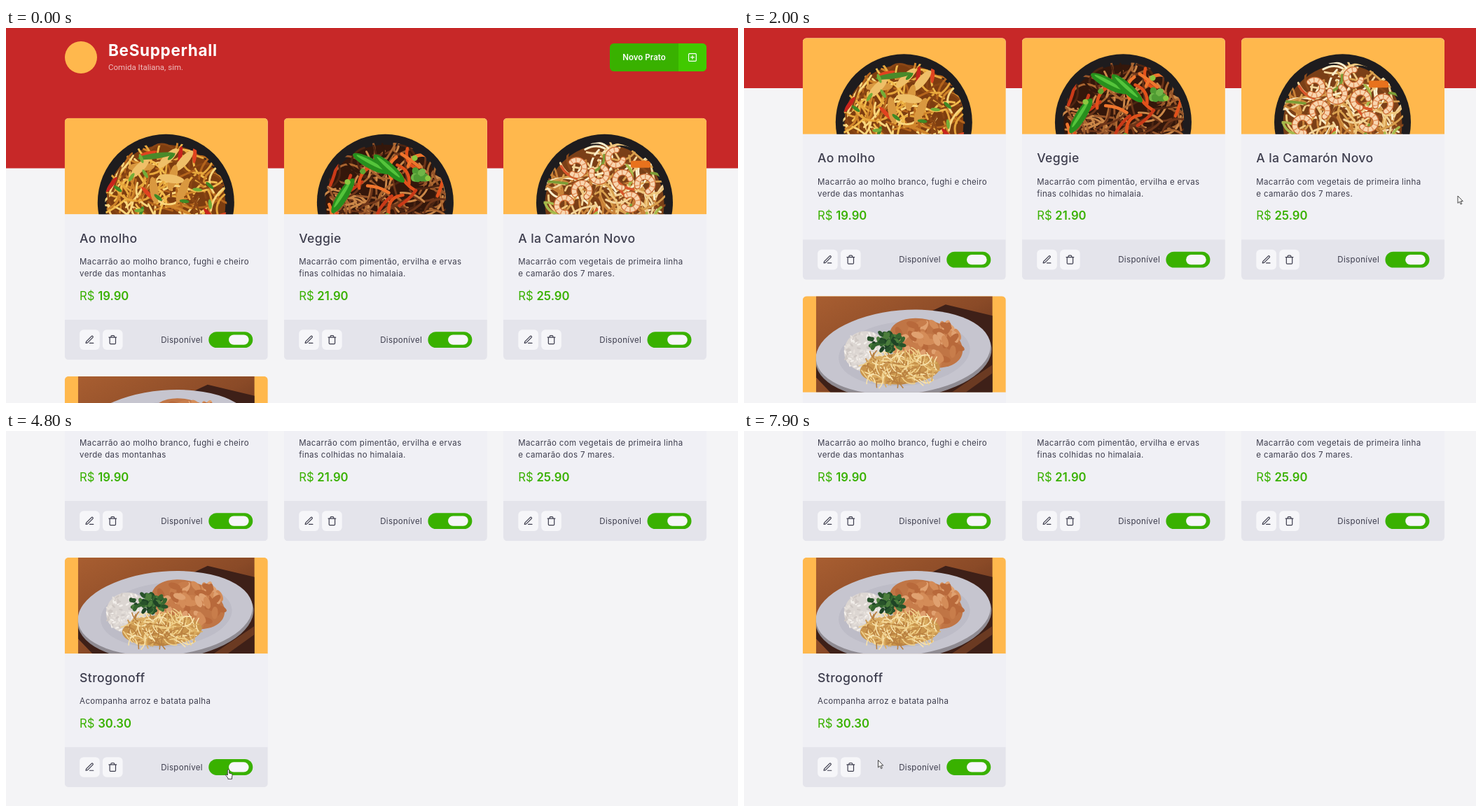
Write an HTML page that moves like this. It is 1045 px wide and 536 px high and loops after 8000 ms.

```html
<!DOCTYPE html>
<html lang="pt-BR">
<head>
<meta charset="utf-8">
<title>Cardápio</title>
<style>
  html, body { margin: 0; width: 100%; height: 100%; overflow: hidden; background: #f4f4f6; }
  svg { display: block; }
  text { font-family: Inter, sans-serif; fill: #3d3d4d; font-size: 11.5px; letter-spacing: .03em; }
  .brand { font-size: 22.5px; font-weight: 700; fill: #fff; }
  .tag { font-family: Roboto, sans-serif; fill: #eebebe; letter-spacing: 0; }
  .new { font-weight: 600; fill: #fff; letter-spacing: 0; text-anchor: middle; }
  .name { font-size: 17.6px; font-weight: 500; letter-spacing: .02em; }
  .price { font-size: 16.7px; fill: #39b100; letter-spacing: 0; }
  .price tspan { font-weight: 600; }
  .state { text-anchor: end; }
  .icon { fill: none; stroke: #3d3d4d; stroke-width: 2; stroke-linecap: round; stroke-linejoin: round; }
  .line { fill: none; stroke-linecap: round; }
  .cursor { fill: #fff; stroke: #333; stroke-width: .9; stroke-linejoin: round; }
</style>
</head>
<body>
<svg id="stage" width="1045" height="536" viewBox="0 0 1045 536"></svg>
<script>
const LOOP = 8000, STEP = 100;
const ORANGE = '#ffb84d', ON = [57, 177, 0], OFF = [199, 40, 40];
const PIC_H = 137.5, FOOT_H = 57.3, LINE_H = 17.2;

const ICONS = {
  edit: 'M12 20h9M16.5 3.5a2.12 2.12 0 0 1 3 3L7 19l-4 1 1-4z',
  trash: 'M3 6h18M19 6v14a2 2 0 0 1-2 2H7a2 2 0 0 1-2-2V6m3 0V4a2 2 0 0 1 2-2h4a2 2 0 0 1 2 2v2',
  plus: 'M5 3h14a2 2 0 0 1 2 2v14a2 2 0 0 1-2 2H5a2 2 0 0 1-2-2V5a2 2 0 0 1 2-2zM12 8v8M8 12h8'
};

let seed = 7919;
const random = () => (seed = (seed * 16807) % 2147483647) / 2147483647;

const rect = (x, y, w, h, fill, r = 0, extra = '') =>
  `<rect x="${x}" y="${y}" width="${w}" height="${h}" rx="${r}" fill="${fill}" ${extra}/>`;
const text = (x, y, cls, str) => `<text x="${x}" y="${y}" class="${cls}">${str}</text>`;
const icon = (name, x, y, style = '') =>
  `<path class="icon" d="${ICONS[name]}" transform="translate(${x} ${y}) scale(.597)" style="${style}"/>`;
const blob = (fill, x, y, rx, ry, turn = 0) =>
  `<ellipse rx="${rx}" ry="${ry}" fill="${fill}" transform="translate(${x} ${y}) rotate(${turn})"/>`;

// Shapes to scatter: each takes a place, a tone and a turn in degrees.
const strand = (len, width) => (x, y, tone, turn) =>
  `<path class="line" stroke="${tone}" stroke-width="${width}" d="M${-len / 2} 0q${len / 2} ${len * (random() - .5)} ${len} 0"
    transform="translate(${x} ${y}) rotate(${turn})"/>`;
const chunk = (rx, ry) => (x, y, tone, turn) => blob(tone, x, y, rx, ry, turn);
const pepper = (x, y, tone, turn) =>
  blob(tone, x, y, 29, 7.5, turn) + blob('#54c43b', x - 1, y - 2, 22, 2.5, turn);
const shrimp = (x, y, tone, turn) =>
  `<g class="line" transform="translate(${x} ${y}) rotate(${turn})">
    <path d="M-8 8A11 11 0 1 1 9 7" stroke="#c9652f" stroke-width="9"/>
    <path d="M-8 8A11 11 0 1 1 9 7" stroke="${tone}" stroke-width="6.5"/>
    <path d="M-8 8A11 11 0 1 1 9 7" stroke="#e79a66" stroke-width="6.5" stroke-dasharray="1.5 5" stroke-linecap="butt"/></g>`;

// Spreads n shapes at random over an ellipse, cycling through the tones.
function scatter(n, tones, [cx, cy, rx, ry], shape) {
  return Array.from({ length: n }, (_, i) => {
    const a = random() * 2 * Math.PI, d = Math.sqrt(random());
    const x = cx + Math.cos(a) * d * rx, y = cy + Math.sin(a) * d * ry;
    return shape(x.toFixed(1), y.toFixed(1), tones[i % tones.length], Math.round(random() * 360));
  }).join('');
}

const FOOD = [144.5, 116, 84, 76];

function bowl(id, base, tones, topping) {
  return rect(0, 0, 290, PIC_H, ORANGE) +
    `<circle cx="144.5" cy="120.5" r="97.5" fill="#1e1c1e"/>
    <clipPath id="${id}"><circle cx="144.5" cy="121" r="87"/></clipPath>
    <g clip-path="url(#${id})"><circle cx="144.5" cy="123" r="85" fill="${base}"/>` +
    scatter(190, tones, FOOD, strand(36, 2.9)) + topping + '</g>';
}

const sauced = () => bowl('sauced', '#7d3d10',
  ['#f2bb4c', '#cf842a', '#f9d67d', '#8a4614', '#e7a73c', '#b5651c'],
  scatter(9, ['#c8241c', '#e0431f'], FOOD, chunk(13, 3)) +
  scatter(8, ['#d9983f', '#efbf68'], [148, 90, 50, 36], chunk(19, 6)) +
  blob('#4a8a2a', 130, 54, 26, 4, -8) +
  scatter(14, ['#3f8a26', '#74ad38'], FOOD, chunk(7, 2.5)));

const veggie = () => bowl('veggie', '#34170b',
  ['#ab6630', '#6d3519', '#cb8748', '#32170b', '#96552a', '#4d2512'],
  scatter(22, ['#e2511b', '#f0752c', '#c93a18'], FOOD, strand(32, 4.5)) +
  pepper(124, 65, '#278f1d', 28) + pepper(150, 72, '#278f1d', 42) + pepper(84, 111, '#278f1d', -58) +
  scatter(7, ['#4f9b33', '#6fb547'], [196, 81, 11, 9], chunk(6, 5)) +
  scatter(12, ['#8cc63f', '#5fa52f'], FOOD, chunk(4, 4)));

const seafood = () => bowl('seafood', '#7a3f17',
  ['#f3d59b', '#d9a04e', '#fbeecb', '#8c4a1c', '#c98238', '#f0c880'],
  scatter(18, ['#7c9c35', '#d9562a', '#a6b94a'], FOOD, strand(28, 3.6)) +
  rect(182, 61, 28, 10, '#e8721d', 2) +
  Array.from({ length: 8 }, (_, i) => {
    const a = Math.PI * (.95 + i / 6.4), r = i % 2 ? 36 : 60;
    return shrimp(146 + Math.cos(a) * r, 115 + Math.sin(a) * r, '#f8d6b0', i * 75 - 60);
  }).join(''));

const stroganoff = () => rect(0, 0, 290, PIC_H, ORANGE) +
  `<linearGradient id="wood" x2="1" y2="1"><stop stop-color="#a85e31"/><stop offset=".5" stop-color="#8a4a27"/>
    <stop offset="1" stop-color="#4a2415"/></linearGradient>
  <clipPath id="photo"><rect x="19" width="252" height="${PIC_H}"/></clipPath>
  <g clip-path="url(#photo)">` + rect(19, 0, 252, PIC_H, 'url(#wood)') +
  `<path d="M204 12L271 28V138H40L19 116V98Z" fill="#3e2018"/>
  <path d="M212 138L271 98V110L232 138Z" fill="#6b3a22"/>` +
  blob('#8f8b92', 144, 84, 126, 62, -5) + blob('#c6c5cf', 143.5, 80, 125, 60, -5) +
  blob('#bdbcc7', 145, 82, 94, 46, -5) +
  blob('#dcd6d2', 90, 79, 31, 29) +
  scatter(110, ['#f3efeb', '#cfc8c4', '#e6e0db'], [90, 79, 31, 28], chunk(3, 1.3)) +
  blob('#c07545', 176, 67, 54, 33, 18) +
  scatter(75, ['#d48c58', '#b8693b', '#e0a170', '#c87d4b'], [176, 66, 50, 29], chunk(9, 4.5)) +
  blob('#c9944c', 139, 104, 57, 22, -3) +
  scatter(130, ['#f0d08a', '#dcae62', '#f8e2ab', '#b98040'], [139, 103, 56, 22], strand(20, 1.6)) +
  scatter(65, ['#1f4426', '#34652f', '#28532a', '#4b7d3c'], [119, 66, 25, 13], chunk(5, 2.8)) + '</g>';

const DISHES = [
  { name: 'Ao molho', lines: ['Macarrão ao molho branco, fughi e cheiro', 'verde das montanhas'], price: '19.90', pic: sauced },
  { name: 'Veggie', lines: ['Macarrão com pimentão, ervilha e ervas', 'finas colhidas no himalaia.'], price: '21.90', pic: veggie },
  { name: 'A la Camarón Novo', lines: ['Macarrão com vegetais de primeira linha', 'e camarão dos 7 mares.'], price: '25.90', pic: seafood },
  { name: 'Strogonoff', lines: ['Acompanha arroz e batata palha'], price: '30.30', pic: stroganoff }
];

function card(dish, i) {
  const x = 83.8 + (i % 3) * 313.1, y = i < 3 ? 128.8 : 497.8;
  const drop = (dish.lines.length - 1) * LINE_H, foot = 271 + drop, mid = foot + FOOT_H / 2;
  const button = (name, bx) =>
    rect(bx, mid - 14.3, 28.6, 28.6, '#f6f6f9', 5.7) + icon(name, bx + 7.15, mid - 7.15);
  return `<g id="card${i}" transform="translate(${x} ${y})">
    <clipPath id="edge${i}"><rect width="290" height="${foot + FOOT_H}" rx="5.7"/></clipPath>
    <g clip-path="url(#edge${i})">` +
    rect(0, 0, 290, foot, '#f0f0f5') + `<g class="pic">${dish.pic()}</g>` +
    rect(0, PIC_H, 290, foot - PIC_H, '#f0f0f5') + rect(0, foot, 290, FOOT_H, '#e4e4eb') + '</g>' +
    text(21.3, 178.2, 'name', dish.name) +
    dish.lines.map((line, n) => text(21.3, 209.4 + n * LINE_H, '', line)).join('') +
    text(21.3, 243 + drop, 'price', `R$ <tspan>${dish.price}</tspan>`) +
    button('edit', 21.3) + button('trash', 54.2) +
    text(197.2, mid + 4.2, 'state', 'Disponível') +
    rect(205.5, mid - 11.45, 63, 22.9, `rgb(${ON})`, 11.45, 'class="track"') +
    rect(211.2, mid - 7.15, 28.6, 14.3, '#f6f6f9', 7.15, 'class="knob"') + '</g>';
}

const stage = document.getElementById('stage');
stage.innerHTML = '<g id="page">' +
  rect(0, 0, 1045, 200.5, '#c72828') +
  `<circle cx="107" cy="42" r="23" fill="${ORANGE}"/>` +
  text(146, 39.5, 'brand', 'BeSupperhall') + text(146, 60, 'tag', 'Comida Italiana, sim.') +
  rect(862, 22, 138, 40, '#39b100', 5.7) +
  '<path d="M960 22h34.3a5.7 5.7 0 0 1 5.7 5.7v28.6a5.7 5.7 0 0 1-5.7 5.7H960z" fill="#41c900"/>' +
  text(911, 46, 'new', 'Novo Prato') + icon('plus', 972.8, 34.8, 'stroke:#fff') +
  DISHES.map(card).join('') + `</g>
  <g id="cursor" class="cursor">
    <path id="arrow" d="M0 0V10.4L2.4 8.2 4.2 12 5.8 11.3 4.1 7.6H7.3Z"/>
    <path id="hand" d="M-1.2 1a1.2 1.2 0 0 1 2.4 0V5.2l3.4 .8q1.2 .3 1 1.7L5 11v2.4H-.6V12L-3.6 8.2q-.5-1.4 .9-1.2L-1.2 8Z"/>
  </g>`;

// Eased progress (0 to 1, slowing down) between two times.
function glide(t, from, to) {
  const u = Math.min(1, Math.max(0, (t - from) / (to - from)));
  return 1 - (1 - u) ** 2;
}

// Pointer strokes, starting off stage.
const ENTRY = { x: 1079, y: 192 };
const STROKES = [
  { from: 400, to: 600, x: 1019, y: 240 },
  { from: 3099, to: 3350, x: 271.5, y: 327 },
  { from: 3600, to: 4000, x: 214.5, y: 412 },
  { from: 4000, to: 4200, x: 239.5, y: 420.5 },
  { from: 4300, to: 4800, x: 317.5, y: 484 },
  { from: 7500, to: 7900, x: 191.5, y: 470.5 }
];

const pointer = t => STROKES.reduce((p, s) => {
  const k = glide(t, s.from, s.to);
  return { x: p.x + (s.x - p.x) * k, y: p.y + (s.y - p.y) * k };
}, ENTRY);

const $ = sel => stage.querySelector(sel);
const page = $('#page'), cursor = $('#cursor'), arrow = $('#arrow'), hand = $('#hand');
const [pic, state, track, knob] = ['pic', 'state', 'track', 'knob'].map(c => $('#card3 .' + c));
const slide = (el, on) => el.setAttribute('transform', `translate(${23 * on})`);
stage.querySelectorAll('.knob').forEach(el => slide(el, 1));

function draw(t) {
  t = Math.floor(t / STEP) * STEP;
  const scroll = 114.5 * glide(t, 1200, 2000) + 202.5 * glide(t, 2340, 2700);
  const on = 1 - glide(t, 5350, 5700) + glide(t, 6700, 7200);
  const { x, y } = pointer(t);
  const overSwitch = x > 289 && x < 352 && y > 470 && y < 492;
  page.setAttribute('transform', `translate(0 ${-scroll})`);
  cursor.setAttribute('transform', `translate(${x} ${y})`);
  arrow.style.display = overSwitch ? 'none' : '';
  hand.style.display = overSwitch ? '' : 'none';
  pic.style.opacity = .3 + .7 * on;
  state.textContent = t > 5350 && t <= 6700 ? 'Indisponível' : 'Disponível';
  track.setAttribute('fill', `rgb(${OFF.map((c, i) => Math.round(c + (ON[i] - c) * on))})`);
  slide(knob, on);
}

const start = performance.now();
function tick() {
  draw((performance.now() - start) % LOOP);
  requestAnimationFrame(tick);
}
tick();
</script>
</body>
</html>
```
